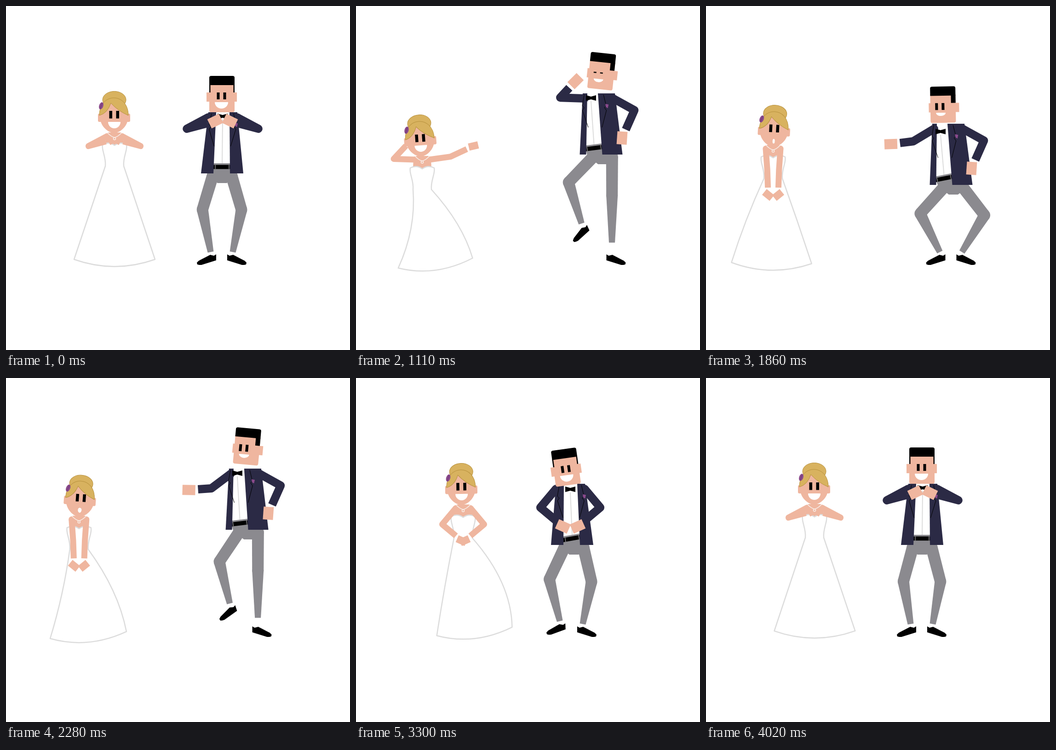
An HTML page with a canvas for the animation above (4050 ms loop, 748 px wide and 748 px high).

```html
<!DOCTYPE html>
<html lang="en">
<head>
<meta charset="utf-8">
<title>Wedding dance</title>
<style>
  html, body { margin: 0; width: 100%; height: 100%; overflow: hidden; background: #fff; }
  canvas { display: block; }
</style>
</head>
<body>
<canvas id="stage" width="748" height="748"></canvas>
<script>
const ctx = document.getElementById('stage').getContext('2d');
const LOOP = 4050, STEP = 30;
const SKIN = '#efb69f', NAVY = '#2b2a45', GREY = '#8b8a8f', BLACK = '#000', WHITE = '#fff',
      BLONDE = '#d8b25f', GOLD = '#b8923e', PURPLE = '#8b4a8c', LACE = '#dcdcdc';

// Angles of upper arm, forearm and palm: 0 points away from the body, 90 down.
const clasp = [28, 195, 206], salute = [-2, 227, 225], point = [1, -16, 7], aim = [-8, -25, -13],
      akimbo = [29, 114, 94], offer = [31, 7, 2], beckon = [73, -13, -22],
      hips = [50, 140, 156], down = [94, 92, 141];

// x, y: collar; ground: middle of the feet; head: chin offset and tilt; lift: raised foot (left < 0)
const groom = {
  rest: { x: 471, y: 231, ground: 469, head: [-1.5, 0, 0], turn: 0, smile: 1, tilt: 0, lift: 0, armL: clasp, armR: clasp },
  dab: { x: 521, y: 273, ground: 520, head: [0.5, 13, 0], turn: 0, smile: 1, tilt: 12, lift: 0, armL: salute, armR: point },
  kick: { x: 528, y: 190, ground: 532.5, head: [2, -9, 6], turn: 1, smile: 0, tilt: -7, lift: -1, armL: salute, armR: akimbo },
  squat: { x: 527, y: 256, ground: 532.5, head: [-11, -2, -1], turn: 1, smile: 0, tilt: -11, lift: 0, armL: offer, armR: akimbo },
  skip: { x: 470, y: 204, ground: 469, head: [-7, -9.5, 0], turn: 1, smile: 1, tilt: -6, lift: 1, armL: beckon, armR: akimbo },
  pose: { x: 466, y: 230, ground: 469, head: [-4, 3, -8], turn: 0, smile: 1, tilt: -10, lift: -0.1, armL: hips, armR: hips }
};
groom.hop = { ...groom.kick, armL: offer };
groom.sway = { ...groom.skip, armL: hips, armR: hips };

// x, y: neckline; puff: air under the skirt; shock: open mouth
const bride = {
  rest: { x: 236, y: 301, head: [-1, -25, 0], turn: 0, puff: 0, shock: 0, armL: clasp, armR: clasp },
  dab: { x: 147, y: 343, head: [0, -12, 0], turn: 0, puff: 0, shock: 0, armL: salute, armR: point },
  aim: { x: 144, y: 352, head: [-2, -25, -4], turn: 0, puff: 0, shock: 0, armL: salute, armR: aim },
  shy: { x: 146, y: 328, head: [0, -22, 3], turn: 0, puff: 2, shock: 1, armL: down, armR: down },
  glance: { x: 237, y: 273, head: [-2, -36, 11], turn: 1, puff: 16, shock: 0, armL: down, armR: down },
  pose: { x: 233, y: 301, head: [-3.5, -25, -1], turn: 0, puff: 11, shock: 0, armL: hips, armR: hips }
};
bride.sway = { ...bride.glance, armL: hips, armR: hips };

// time, groom, bride, bounce
const keys = [
  [0, 'rest', 'rest'],
  [130, 'rest', 'rest', -10],
  [420, 'dab', 'dab'],
  [780, 'dab', 'dab', 4],
  [1110, 'kick', 'aim'],
  [1620, 'squat', 'shy', 6],
  [1860, 'squat', 'shy'],
  [2160, 'hop', 'shy', 6],
  [2670, 'skip', 'glance'],
  [2745, 'skip', 'glance', -7],
  [3120, 'pose', 'pose', 8],
  [3300, 'pose', 'pose'],
  [3540, 'sway', 'sway'],
  [3830, 'rest', 'rest', 10],
  [4020, 'rest', 'rest', -1],
  [LOOP, 'rest', 'rest']
].map(([t, g, b, bounce = 0]) => ({ t, groom: dip(groom[g], bounce), bride: dip(bride[b], bounce) }));

function dip(pose, dy) {
  return { ...pose, y: pose.y + dy };
}

const lerp = (a, b, k) => a + (b - a) * k;
const rad = d => d * Math.PI / 180;
const cos = d => Math.cos(rad(d)), sin = d => Math.sin(rad(d));

// Shortest way round; a palm looks the same after half a turn.
function turnTo(a, b, k, full) {
  const d = (((b - a) % full) + full) % full;
  return a + (d > full / 2 ? d - full : d) * k;
}

function mixPose(a, b, k) {
  const out = {};
  for (const part in a) {
    const from = a[part], to = b[part];
    if (part.startsWith('arm')) out[part] = from.map((v, i) => turnTo(v, to[i], k, i < 2 ? 360 : 180));
    else if (Array.isArray(from)) out[part] = from.map((v, i) => lerp(v, to[i], k));
    else out[part] = lerp(from, to, k);
  }
  return out;
}

// drawing helpers
function poly(color, pts) {
  ctx.fillStyle = color;
  ctx.beginPath();
  pts.forEach(([x, y]) => ctx.lineTo(x, y));
  ctx.fill();
}
function line(color, width, pts) {
  ctx.strokeStyle = color;
  ctx.lineWidth = width;
  ctx.lineJoin = 'round';
  ctx.beginPath();
  pts.forEach(([x, y]) => ctx.lineTo(x, y));
  ctx.stroke();
}
function oval(color, x, y, rx, ry = rx, rot = 0, end = 2 * Math.PI) {
  ctx.fillStyle = color;
  ctx.beginPath();
  ctx.ellipse(x, y, rx, ry, rot, 0, end);
  ctx.fill();
}
function box(color, x, y, w, h, r = 0) {
  ctx.fillStyle = color;
  ctx.beginPath();
  ctx.roundRect(x, y, w, h, r);
  ctx.fill();
}
function at(x, y, rot, draw, flip = 1) {
  ctx.save();
  ctx.translate(x, y);
  ctx.rotate(rad(rot));
  ctx.scale(flip, 1);
  draw();
  ctx.restore();
}
function taper([ax, ay], [bx, by], wa, wb) {
  const len = Math.hypot(bx - ax, by - ay) || 1;
  const nx = (ay - by) / len / 2, ny = (bx - ax) / len / 2;
  poly(GREY, [[ax + nx * wa, ay + ny * wa], [bx + nx * wb, by + ny * wb],
              [bx - nx * wb, by - ny * wb], [ax - nx * wa, ay - ny * wa]]);
}

// Draws the sleeve and returns a function that draws the hand on top of it.
function arm(side, x, y, [upper, fore, palm], color, width, upperLen, foreLen, handGap, handW, handH) {
  const reach = (p, angle, len) => [p[0] + side * cos(angle) * len, p[1] + sin(angle) * len];
  const elbow = reach([x, y], upper, upperLen);
  const wrist = reach(elbow, fore, foreLen);
  const hand = reach(wrist, fore, handGap);
  oval(color, x, y, width / 2);
  line(color, width, [[x, y], elbow, wrist]);
  return () => at(...hand, side * palm, () => box(SKIN, -handW / 2, -handH / 2, handW, handH));
}

// Two-bone leg: the knee bends outwards, a straight leg stretches a little.
function leg(side, hip, foot) {
  const thigh = 77, shin = 94, full = thigh + shin;
  const dx = foot[0] - hip[0], dy = foot[1] - hip[1], dist = Math.hypot(dx, dy);
  const ux = dx / dist, uy = dy / dist, d = Math.min(dist, full * 1.09);
  const along = d < full ? (d * d + thigh * thigh - shin * shin) / (2 * d) : thigh * d / full;
  const bend = d < full ? Math.sqrt(Math.max(0, thigh * thigh - along * along)) * side : 0;
  const knee = [hip[0] + ux * along + uy * bend, hip[1] + uy * along - ux * bend];
  oval(GREY, ...hip, 13);
  taper(hip, knee, 26, 25);
  oval(GREY, ...knee, 12.5);
  taper(knee, [hip[0] + ux * d, hip[1] + uy * d], 25, 13);
}

function shoe() {
  poly(BLACK, [[0, -1], [-5, 2], [-13, 0], [-38, 13], [-42, 17], [-41, 21], [-37, 22], [-32, 22], [0, 12]]);
}

function drawGroom(p, blink) {
  const { x, y, ground, turn, tilt } = p;
  const mix = (a, b) => lerp(a, b, turn);
  const H = 133, hem = ground + 1;
  const spot = (dx, dy) => [x + dx + (hem - x) * dy / H, y + dy];

  const hipX = hem - 0.4 * tilt, hipY = y + 138;
  for (const side of [-1, 1]) {
    const up = Math.max(0, side * p.lift);
    const ankle = [ground + side * (24 + 18 * up), 535 - 62 * up];
    at(ankle[0] - side * 12, ankle[1] + 6 - 2 * up, side * 25 * up, shoe, -side);
    leg(side, [hipX + side * 20.5, hipY], ankle);
  }
  const beltX = hem - 16 * turn, beltY = y + 119, drop = Math.tan(rad(tilt)) * 20;
  poly(GREY, [[beltX - 20, beltY - 8 - drop], [beltX + 20, beltY - 8 + drop], [hipX + 33, hipY - 2],
              [hipX + 10, hipY + 16], [hipX - 10, hipY + 16], [hipX - 33, hipY - 2]]);
  at(beltX, beltY, tilt, () => {
    box(BLACK, -20, -4.5, 40, 9);
    for (const side of [-1, 1]) box(GREY, side * 15 - 0.75, -4.5, 1.5, 9);
  });

  const [chinX, chinY, headTilt] = p.head;
  const bowX = x - 17 * turn, bowY = y + chinY + 9 + 10 * turn;
  line(LACE, 2, [[bowX, bowY + 7], [beltX, beltY - 8]]);
  poly(NAVY, [spot(mix(-31, -35), 0), spot(mix(-14, -25), 0), spot(mix(-19, -33), H), spot(mix(-46, -47), H)]);
  poly(NAVY, [spot(mix(15, -2), 0), spot(mix(32, 35), 0), spot(46, H), spot(mix(17, 2), H)]);

  const hands = [[-1, p.armL], [1, p.armR]].map(([side, angles]) => {
    const fore = side < 0 ? mix(46, 29) : 46;
    return arm(side, x + side * 31, y + 11, angles, NAVY, 18, 53, fore, mix(18, 20), 28, 22);
  });

  // lapels with a notch
  for (const side of [-1, 1]) {
    const edge = side < 0 ? mix(-27, -35) : mix(27, 13);
    line(BLACK, 1, [spot(edge - side * 3, 3), spot(edge + side * 2, 27), spot(edge - side * 2, 31),
                    spot(edge + side * 2, 37), spot(edge - side * 9, 74)]);
  }
  at(...spot(mix(29, 16), 27), 20, () => poly(PURPLE, [[-4, -3], [3, -4], [4, 4], [-1, 3]]));
  at(bowX, bowY, 0, () => poly(BLACK, [[-11, -6], [0, -3], [11, -6], [11, 6], [0, 3], [-11, 6]]));
  hands.forEach(draw => draw());

  at(x + chinX, y + chinY, headTilt, () => {
    box(SKIN, mix(-33.5, -31), -43, 10, 20);
    box(SKIN, 22, -43, mix(10.5, 13), 20);
    box(SKIN, -27.5, -62, 55, 62, [0, 0, 4, 4]);
    box(BLACK, -27.5, -79, 55, 20, [4, 4, 0, 0]);
    box(BLACK, -27.5, -60, mix(2.5, 0), 17);
    box(BLACK, mix(25, 17.5), -60, mix(2.5, 10), 17);
    const eyeH = blink ? 2.5 : 15;
    for (const dx of [0, 14]) box(BLACK, mix(-11, -17) + dx, -35.5 - eyeH / 2, 6, eyeH);
    oval(WHITE, mix(-1, -5), -22, lerp(10.5, 14.5, p.smile), lerp(7, 14, p.smile), 0, Math.PI);
  });
}

// The hem swings like a pendulum and comes to rest at both ends of the loop.
function hemSwing(t) {
  const calm = Math.min(1, t / 300, (LOOP - t) / 300);
  return -29 * calm * Math.cos(2 * Math.PI * (t - 555) / 1060);
}

function drawDress(x, y, puff, swing) {
  const waist = y + 47, half = 88 - Math.abs(swing) / 4;
  const hemX = x + swing, hemY = 551 + Math.min(8, y - 301);
  const side = s => {
    const endX = hemX + s * half, endY = hemY - s * 0.375 * swing;
    const bulge = (0.4 * swing + s * puff) * 4 / 3;
    const along = k => [lerp(x + s * 20, endX, k) + bulge, lerp(waist, endY, k)];
    return { c1: along(1 / 3), c2: along(2 / 3), end: [endX, endY] };
  };
  const L = side(-1), R = side(1);

  ctx.beginPath();
  ctx.moveTo(x - 20, waist);
  ctx.bezierCurveTo(x - 18, waist - 20, x - 29, y + 12, x - 26, y);
  ctx.quadraticCurveTo(x - 12, y - 7, x, y + 2);
  ctx.quadraticCurveTo(x + 12, y - 7, x + 26, y);
  ctx.bezierCurveTo(x + 29, y + 12, x + 18, waist - 20, x + 20, waist);
  ctx.bezierCurveTo(...R.c1, ...R.c2, ...R.end);
  ctx.quadraticCurveTo(hemX, hemY + 31, ...L.end);
  ctx.bezierCurveTo(...L.c2, ...L.c1, x - 20, waist);
  ctx.closePath();
  ctx.fillStyle = WHITE;
  ctx.fill();
  ctx.strokeStyle = LACE;
  ctx.lineWidth = 2.5;
  ctx.lineJoin = 'round';
  ctx.stroke();
}

function drawBride(p, swing) {
  const { x, y } = p;
  poly(SKIN, [[x - 13, y - 26], [x + 13, y - 26], [x + 19, y - 22], [x + 20, y],
              [x, y + 4], [x - 20, y], [x - 19, y - 22]]);
  drawDress(x, y, p.puff, swing);
  [[-1, p.armL], [1, p.armR]]
    .map(([side, angles]) => arm(side, x + side * 16, y - 18, angles, SKIN, 13, 46, 39, 16, 21, 16))
    .forEach(draw => draw());

  ctx.strokeStyle = '#f8efea';
  ctx.lineWidth = 1.5;
  ctx.beginPath();
  ctx.moveTo(x - 16, y - 26);
  ctx.quadraticCurveTo(x - 8, y - 17, x, y - 15);
  ctx.quadraticCurveTo(x + 8, y - 17, x + 16, y - 26);
  ctx.moveTo(x + 2.5, y - 12.5);
  ctx.arc(x, y - 12.5, 2.5, 0, 7);
  ctx.stroke();

  const [dx, dy, tilt] = p.head;
  at(x + dx, y + dy, tilt, () => drawBrideHead(p.turn, p.shock));
}

function drawBrideHead(turn, shock) {
  const rise = -9 * turn;
  ctx.strokeStyle = GOLD;
  ctx.lineWidth = 1;
  oval(BLONDE, 0.5 - 4 * turn, -72, 25.5, 18.5);
  ctx.stroke();

  ctx.fillStyle = SKIN;
  ctx.beginPath();
  ctx.moveTo(-30, -45 + rise);
  ctx.lineTo(-30, -28 + rise);
  ctx.bezierCurveTo(-26, -10, -10, 0, 0, 0);
  ctx.bezierCurveTo(10, 0, 26, -10, 30, -28 + rise);
  ctx.lineTo(30, -45 + rise);
  ctx.lineTo(0, -70 + rise);
  ctx.fill();

  ctx.translate(0, rise);
  box(SKIN, -35 - 2 * turn, -42, 10, 18, 3);
  box(SKIN, 25 - 5 * turn, -42, 10, 18, 3);
  ctx.fillStyle = BLONDE;
  ctx.beginPath();
  ctx.moveTo(-32, -38);
  ctx.bezierCurveTo(-32, -89, 31, -89, 31, -38);
  ctx.quadraticCurveTo(8, -48, -7 + 4 * turn, -65);
  ctx.quadraticCurveTo(-14, -43, -32, -38);
  ctx.fill();
  ctx.stroke();
  oval(PURPLE, -28 + 2 * turn, -59, 4.5, 8, rad(18));
  line('#5e2f66', 0.8, [[-30 + 2 * turn, -53], [-26 + 2 * turn, -65]]);

  for (const dx of [0, 15]) box(BLACK, -10.5 + 8 * turn + dx, -48, 6.5, 16.5);
  const mx = 0.5 + 2 * turn, my = lerp(-24, -12, shock), mw = lerp(13.5, 2.5, shock);
  oval(WHITE, mx, my, mw, lerp(14, 5, shock), 0, Math.PI);
  oval(WHITE, mx, my, mw, 5 * shock, Math.PI, Math.PI);
}

function frame() {
  const t = Math.floor((performance.now() % LOOP) / STEP) * STEP;
  const i = keys.findIndex(key => key.t > t);
  const a = keys[i - 1], b = keys[i];
  const s = (t - a.t) / (b.t - a.t), k = s * s * (3 - 2 * s);
  ctx.fillStyle = WHITE;
  ctx.fillRect(0, 0, 748, 748);
  drawBride(mixPose(a.bride, b.bride, k), hemSwing(t));
  drawGroom(mixPose(a.groom, b.groom, k), t >= 1080 && t <= 1170);
  requestAnimationFrame(frame);
}
frame();
</script>
</body>
</html>
```
